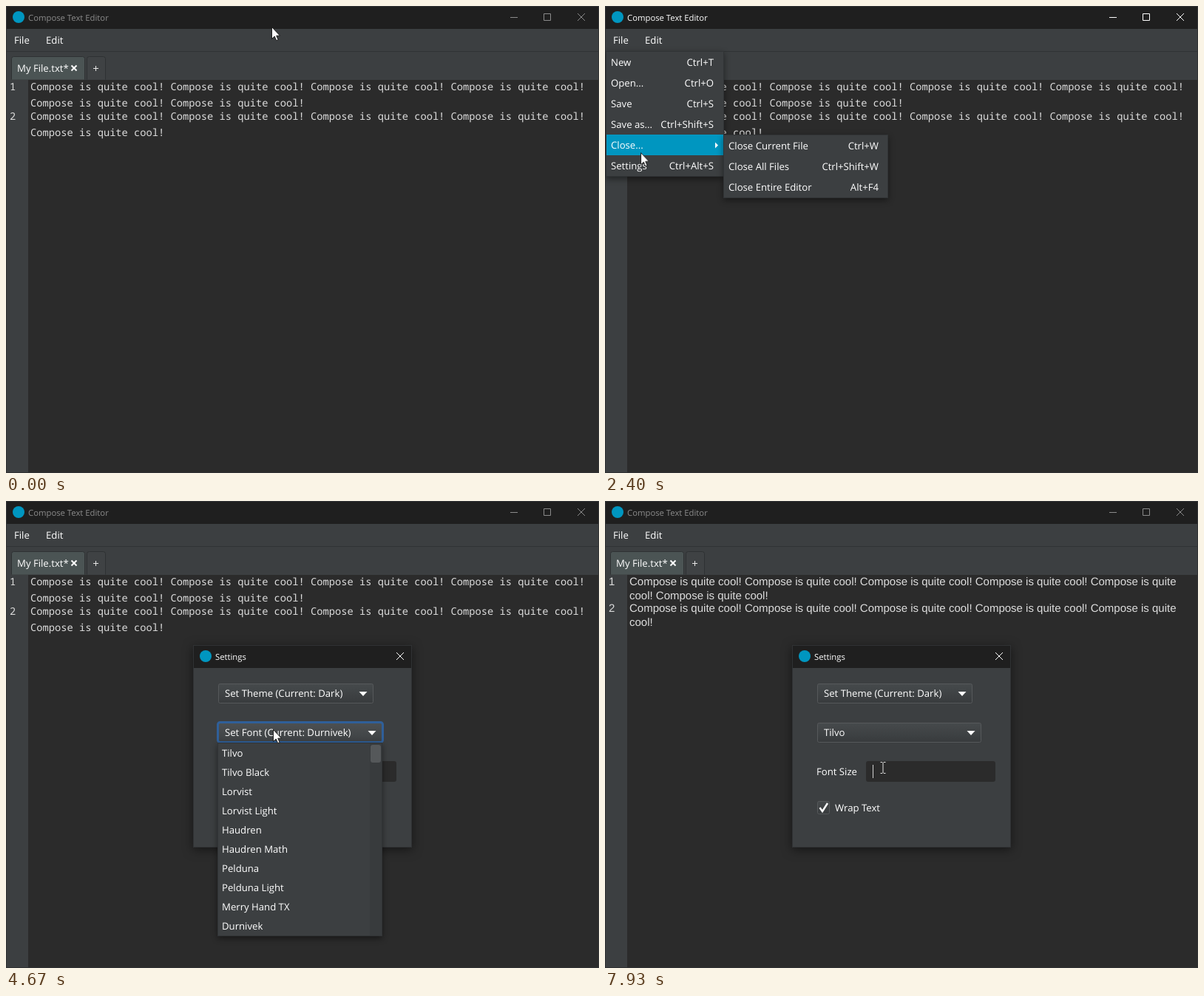
Animation of 802 by 632 pixels, one loop 8000 ms. Source, as an HTML page:

```html
<!DOCTYPE html>
<html lang="en">
<head>
<meta charset="utf-8">
<title>Compose Text Editor</title>
<style>
html, body { margin: 0; width: 100%; height: 100%; overflow: hidden; background: #2b2b2b; }
svg { display: block; width: 802px; height: 632px; text-rendering: geometricPrecision; }
text { font: 13.17px "Open Sans", "Noto Sans", sans-serif; fill: #fff; }
.title text { font-size: 11.3px; fill: currentColor; }
.title path { fill: none; stroke: currentColor; }
.mono text { font: 13.746px "Noto Sans Mono", monospace; fill: #dcdcdc; }
.sans text { font: 15px "Liberation Sans", sans-serif; fill: #dcdcdc; }
.end { text-anchor: end; }
.panel { fill: #3c3f41; }
.edge { fill: #3c3f41; stroke: #313436; }
.accent { fill: #0096c0; }
.button { fill: url(#face); stroke: #56595b; }
.ring { fill: none; stroke: #2f5f99; stroke-width: 3; }
.shadow { filter: drop-shadow(0 3px 4px rgba(0, 0, 0, .45)); }
.white { fill: #fff; }

/* Percentages of the 8 s loop: 1% = 80 ms */
.anim { animation: 8s step-end infinite; }
#title { animation-name: title; }
#fileHover { animation-name: fileHover; }
#caret { animation-name: caret; }
#menu { animation-name: menu; }
#row { animation-name: row; }
#submenu { animation-name: submenu; }
#dialog { animation-name: dialog; }
#themeRing { animation-name: themeRing; }
#themeHover { animation-name: themeHover; }
#fontRing { animation-name: fontRing; }
#fontHover { animation-name: fontHover; }
#oldLabel { animation-name: untilPick; }
#newLabel { animation-name: afterPick; }
#oldText { animation-name: untilApplied; }
#newText { animation-name: afterApplied; }
#popup { animation-name: popup; }
#option { animation-name: option; }
#prompt { animation-name: prompt; }
#fieldCaret { animation-name: fieldCaret; }
#arrow { animation-name: arrow; }
#beam { animation-name: beam; }
#pointer { animation: pointer 8s linear infinite; }

@keyframes title { 0% { color: #8b8b8b } 6.6% { color: #fff } 36.5% { color: #8b8b8b } }
@keyframes fileHover { 0% { opacity: 0 } 18.2% { opacity: 1 } 24% { opacity: 0 } }
@keyframes caret {
  0% { opacity: 0 } 6.6% { opacity: 1 } 12.8% { opacity: 0 } 19% { opacity: 1 }
  25.5% { opacity: 0 } 31.5% { opacity: 1 } 36.5% { opacity: 0 }
}
@keyframes menu { 0% { opacity: 0 } 21.5% { opacity: 1 } 35.8% { opacity: 0 } }
@keyframes row {
  0% { transform: none; opacity: 0 }
  24% { transform: none; opacity: 1 }
  26% { transform: translateY(28px); opacity: 1 }
  27.3% { transform: translateY(56px); opacity: 1 }
  28% { transform: translateY(84px); opacity: 1 }
  28.9% { transform: translateY(112px); opacity: 1 }
  30.5% { transform: translateY(140px); opacity: 1 }
}
@keyframes submenu { 0% { opacity: 0 } 29.1% { opacity: 1 } 31.4% { opacity: 0 } }
@keyframes dialog { 0% { opacity: 0 } 36.5% { opacity: 1 } }
@keyframes themeRing { 0% { opacity: 1 } 58.2% { opacity: 0 } }
@keyframes themeHover { 0% { opacity: 0 } 45% { opacity: 1 } 52.3% { opacity: 0 } }
@keyframes fontRing { 0% { opacity: 0 } 58.2% { opacity: 1 } 94% { opacity: 0 } }
@keyframes fontHover {
  0% { opacity: 0 } 54% { opacity: 1 } 79.8% { opacity: 0 }
  81% { opacity: 1 } 90% { opacity: 0 }
}
@keyframes untilPick { 0% { opacity: 1 } 67.4% { opacity: 0 } }
@keyframes afterPick { 0% { opacity: 0 } 67.4% { opacity: 1 } }
@keyframes untilApplied { 0% { opacity: 1 } 68.2% { opacity: 0 } }
@keyframes afterApplied { 0% { opacity: 0 } 68.2% { opacity: 1 } }
@keyframes popup { 0% { opacity: 0 } 58.2% { opacity: 1 } 67.4% { opacity: 0 } }
@keyframes option { 0% { opacity: 0 } 63.2% { opacity: 1 } }
@keyframes prompt { 0% { opacity: 1 } 94% { opacity: 0 } }
@keyframes fieldCaret { 0% { opacity: 0 } 94% { opacity: 1 } }
@keyframes arrow { 0% { opacity: 1 } 2.9% { opacity: 0 } 15% { opacity: 1 } 90.5% { opacity: 0 } }
@keyframes beam { 0% { opacity: 0 } 2.9% { opacity: 1 } 15% { opacity: 0 } 90.5% { opacity: 1 } }
@keyframes pointer {
  0%, .2% { transform: translate(359px, 28px) }
  7.5%, 9.3% { transform: translate(356px, 219px) }
  12.5% { transform: translate(270px, 176px) }
  15% { transform: translate(140px, 100px) }
  17% { transform: translate(55px, 58px) }
  19.1%, 23.4% { transform: translate(20px, 44px) }
  25% { transform: translate(21px, 77px) }
  26.6% { transform: translate(25px, 104px) }
  28.4% { transform: translate(38px, 158px) }
  30% { transform: translate(48px, 198px) }
  31.6%, 35.9% { transform: translate(50px, 216px) }
  37% { transform: translate(90px, 219px) }
  39.1% { transform: translate(214px, 226px) }
  42.5% { transform: translate(318px, 243px) }
  45.8% { transform: translate(368px, 261px) }
  47.5%, 51% { transform: translate(367px, 266px) }
  55%, 61% { transform: translate(361px, 309px) }
  65%, 79% { transform: translate(345px, 343px) }
  80% { transform: translate(344px, 342px) }
  81.6%, 89.4% { transform: translate(352px, 318px) }
  90.8%, 98.7% { transform: translate(380px, 369px) }
  99%, 100% { transform: translate(376px, 361px) }
}
</style>
</head>
<body>
<svg viewBox="0 0 802 632">
  <defs>
    <linearGradient id="face" x2="0" y2="1">
      <stop stop-color="#464a4c"/><stop offset="1" stop-color="#383b3d"/>
    </linearGradient>
  </defs>

  <!-- Editor window -->
  <rect width="802" height="632" fill="#2b2b2b"/>
  <rect width="802" height="31" fill="#1f1f1f"/>
  <rect class="panel" y="31" width="802" height="69"/>
  <rect class="panel" y="99" width="30" height="533"/>
  <path d="M0 61.5H802" stroke="#303335"/>
  <g id="title" class="title anim">
    <text x="30" y="20">Compose Text Editor</text>
    <path d="M682 15.5h10M727.5 10.5h9v9h-9zM773 10l10 10M783 10l-10 10"/>
  </g>
  <circle class="accent" cx="17" cy="15" r="8"/>
  <rect id="fileHover" class="accent anim" x="1" y="31" width="42" height="30"/>
  <text x="11" y="51">File</text>
  <text x="54" y="51">Edit</text>

  <path d="M7.5 99.5V71.500q0-3 3-3h93q3 0 3 3v28" fill="#4b5454" stroke="#2e3133"/>
  <path d="M109.500 99.500v-28q0-3 3-3h19q3 0 3 3v28" fill="#3f4244" stroke="#2e3133"/>
  <text x="15" y="89">My File.txt*</text>
  <path d="M88.500 80.500l7 7m0-7l-7 7" stroke="#fff" stroke-width="2"/>
  <path d="M118 84.500h7m-3.500-3.500v7" stroke="#e6e6e6"/>

  <g id="oldText" class="mono anim">
    <text x="5" y="114">1</text>
    <text x="33" y="114">Compose is quite cool! Compose is quite cool! Compose is quite cool! Compose is quite cool!</text>
    <text x="33" y="136">Compose is quite cool! Compose is quite cool!</text>
    <text x="5" y="154">2</text>
    <text x="33" y="154">Compose is quite cool! Compose is quite cool! Compose is quite cool! Compose is quite cool!</text>
    <text x="33" y="176">Compose is quite cool!</text>
  </g>
  <g id="newText" class="sans anim">
    <text x="5" y="114">1</text>
    <text x="33" y="114">Compose is quite cool! Compose is quite cool! Compose is quite cool! Compose is quite cool! Compose is quite</text>
    <text x="33" y="133">cool! Compose is quite cool!</text>
    <text x="5" y="150">2</text>
    <text x="33" y="150">Compose is quite cool! Compose is quite cool! Compose is quite cool! Compose is quite cool! Compose is quite</text>
    <text x="33" y="169">cool!</text>
  </g>
  <path id="caret" class="anim" d="M223 162v22" stroke="#c4c4c4" stroke-width="1.5"/>
  <rect x=".5" y=".5" width="801" height="631" fill="none" stroke="#303234"/>

  <!-- File menu -->
  <g id="menu" class="anim">
    <g class="shadow">
      <rect class="edge" x="1.500" y="61.500" width="159" height="169"/>
      <rect id="row" class="accent anim" x="2" y="62" width="158" height="28"/>
    </g>
    <text x="8" y="81">New</text><text class="end" x="147" y="81">Ctrl+T</text>
    <text x="8" y="109">Open...</text><text class="end" x="147" y="109">Ctrl+O</text>
    <text x="8" y="137">Save</text><text class="end" x="147" y="137">Ctrl+S</text>
    <text x="8" y="165">Save as...</text><text class="end" x="147" y="165">Ctrl+Shift+S</text>
    <text x="8" y="193">Close...</text><path class="white" d="M149 184.500l4 4-4 4z"/>
    <text x="8" y="221">Settings</text><text class="end" x="147" y="221">Ctrl+Alt+S</text>
    <g id="submenu" class="anim">
      <rect class="edge shadow" x="160.500" y="174.500" width="222" height="85"/>
      <text x="167" y="194">Close Current File</text><text class="end" x="370" y="194">Ctrl+W</text>
      <text x="167" y="222">Close All Files</text><text class="end" x="370" y="222">Ctrl+Shift+W</text>
      <text x="167" y="250">Close Entire Editor</text><text class="end" x="370" y="250">Alt+F4</text>
    </g>
  </g>

  <!-- Settings dialog -->
  <g id="dialog" class="anim">
    <rect x="253" y="195" width="296" height="274" fill="#303234" style="filter:drop-shadow(0 3px 7px rgba(0,0,0,.5))"/>
    <rect x="254" y="196" width="294" height="30" fill="#1f1f1f"/>
    <rect class="panel" x="254" y="226" width="294" height="242"/>
    <circle class="accent" cx="270" cy="210" r="8"/>
    <g class="title" color="#fff">
      <text x="283" y="215">Settings</text>
      <path d="M528 205l10 10m0-10l-10 10"/>
    </g>

    <rect class="button" x="287.500" y="247.500" width="209" height="26" rx="2"/>
    <rect id="themeHover" class="anim" x="288" y="248" width="208" height="25" fill="#fff" fill-opacity=".03"/>
    <rect id="themeRing" class="ring anim" x="286.500" y="246.500" width="211" height="27" rx="3"/>
    <text x="296" y="265">Set Theme (Current: Dark)</text>
    <path class="white" d="M477.500 258h11l-5.500 6z"/>

    <rect class="button" x="287.500" y="300.500" width="221" height="26" rx="2"/>
    <rect id="fontHover" class="anim" x="288" y="301" width="220" height="25" fill="#fff" fill-opacity=".03"/>
    <rect id="fontRing" class="ring anim" x="286.500" y="299.500" width="223" height="27" rx="3"/>
    <text id="oldLabel" class="anim" x="296" y="318">Set Font (Current: Durnivek)</text>
    <text id="newLabel" class="anim" x="296" y="318">Tilvo</text>
    <path class="white" d="M489.500 311h11l-5.500 6z"/>

    <text x="286" y="371">Font Size</text>
    <rect x="353" y="352" width="175" height="28" rx="3" fill="#2b2b2b"/>
    <text id="prompt" class="anim" x="363" y="371" style="fill:#686868">Current Font Size: 15</text>
    <path id="fieldCaret" class="anim" d="M362.500 357v18" stroke="#d0d0d0"/>

    <rect class="button" x="287.500" y="406.500" width="16" height="17" rx="2"/>
    <path d="M290.500 415l3.500 5 7-11" fill="none" stroke="#fff" stroke-width="2.400"/>
    <text x="311" y="420">Wrap Text</text>

    <g id="popup" class="anim">
      <rect class="edge shadow" x="286.500" y="327.500" width="222" height="261"/>
      <rect x="492" y="328" width="16" height="260" fill="#383b3d"/>
      <rect x="493" y="330" width="14" height="24" rx="3" fill="#55585a"/>
      <rect id="option" class="accent anim" x="287" y="328" width="204" height="26"/>
      <text x="292" y="346">Tilvo</text>
      <text x="292" y="372">Tilvo Black</text>
      <text x="292" y="398">Lorvist</text>
      <text x="292" y="424">Lorvist Light</text>
      <text x="292" y="450">Haudren</text>
      <text x="292" y="476">Haudren Math</text>
      <text x="292" y="502">Pelduna</text>
      <text x="292" y="528">Pelduna Light</text>
      <text x="292" y="554">Merry Hand TX</text>
      <text x="292" y="580">Durnivek</text>
    </g>
  </g>

  <g id="pointer">
    <path id="arrow" class="anim" d="M.5.5v16l3.700-3.500 2.500 5.700 2.400-1-2.400-5.500h4.800z" fill="#fff" stroke="#111" stroke-width=".9"/>
    <path id="beam" class="anim" d="M-3.500-7.500h2.500l1 1 1-1h2.500M-3.500 7.500h2.500l1-1 1 1h2.500M0-6.500v13" fill="none" stroke="#e0e0e0"/>
  </g>
</svg>
</body>
</html>
```
